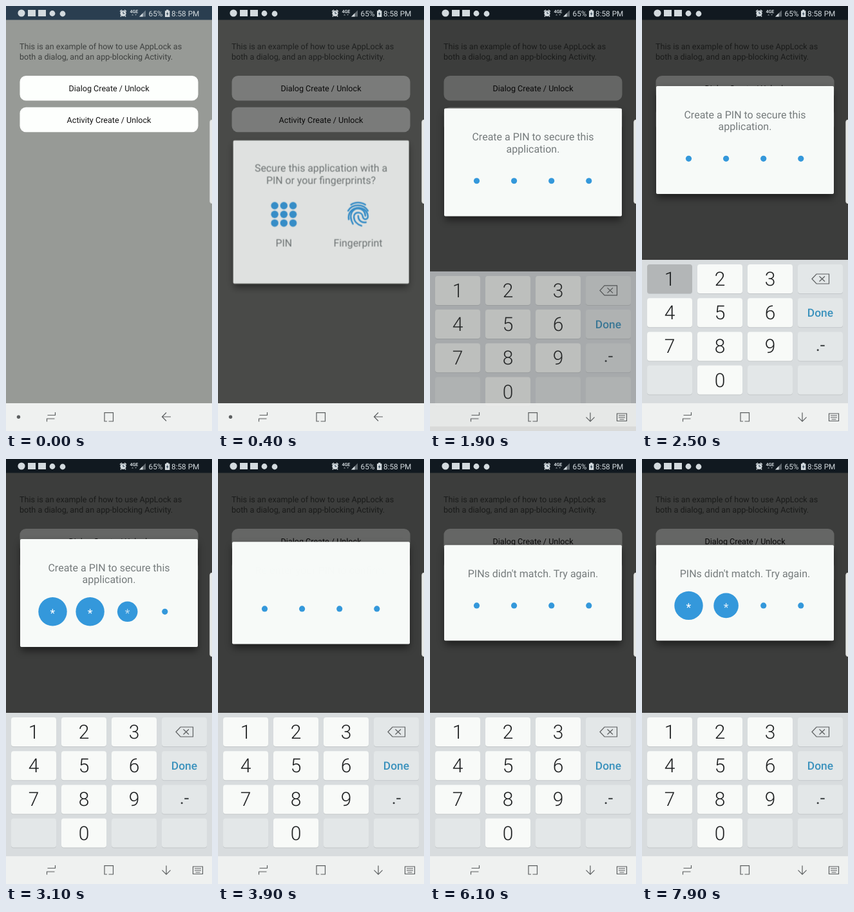
Recreate the animation shown at these times as an HTML page. Size 320 by 658 pixels, loop 8 s.

```html
<!DOCTYPE html>
<html lang="en">
<head>
<meta charset="utf-8">
<title>App lock demo</title>
<style>
html, body { margin: 0; width: 100%; height: 100%; overflow: hidden; background: #979a96; }
svg { display: block; width: 100vw; height: 100vh; }
text { font-family: Roboto, sans-serif; text-rendering: geometricPrecision; }
.mid { text-anchor: middle; }
.body { font-size: 12.6px; }
.msg { font-size: 16px; fill: #757b7c; text-anchor: middle; }
.digit { font-size: 30px; font-weight: 300; fill: #1d1f20; text-anchor: middle; }
.line { fill: none; stroke: #5c5f60; stroke-width: 1.2; }
.finger { fill: none; stroke: #3498db; stroke-width: 2.5; stroke-linecap: round; }
.blue { fill: #3498db; }
</style>
</head>
<body>
<svg viewBox="0 0 320 658" xmlns="http://www.w3.org/2000/svg">
  <defs>
    <filter id="blur" x="-20%" y="-20%" width="140%" height="150%"><feGaussianBlur stdDeviation="6"/></filter>
    <clipPath id="cut"><rect id="cutRect" width="320" height="658"/></clipPath>
  </defs>

  <rect width="320" height="658" fill="#979a96"/>
  <rect width="320" height="21.5" fill="#2a3e50"/>
  <g class="body" fill="#3e403f">
    <text x="21" y="66.5">This is an example of how to use AppLock as</text>
    <text x="21" y="83">both a dialog, and an app-blocking Activity.</text>
  </g>
  <rect x="21.5" y="108" width="277" height="38.5" rx="9.5" fill="#fdfffd"/>
  <rect x="21.5" y="156.7" width="277" height="38.5" rx="9.5" fill="#fdfffd"/>
  <g class="body mid" fill="#141414">
    <text x="160" y="132">Dialog Create / Unlock</text>
    <text x="160" y="180.8">Activity Create / Unlock</text>
  </g>
  <rect id="dim" width="320" height="658"/>

  <g fill="#d3dade">
    <circle cx="24" cy="11" r="5.6"/>
    <rect x="34" y="6" width="12" height="10"/>
    <rect x="50" y="6" width="12" height="10"/>
    <circle cx="72" cy="11.5" r="4.4"/>
    <circle cx="88" cy="12" r="4.4"/>
    <circle cx="182" cy="11.5" r="4.6"/>
    <path d="M177 8.5L180 6M187 8.5L184 6M179 15L178 16.5M185 15L186 16.5" stroke="#d3dade" stroke-width="1.5"/>
    <path d="M182 8.7V11.7H184.3" fill="none" stroke="#2a3e50"/>
    <text x="192.5" y="11" font-size="7" font-weight="700">4GE</text>
    <path d="M195 14.5l1.6-2 1.6 2zM200 12.8h3.2l-1.6 2z" opacity=".6"/>
    <path d="M207 16.5L217 6.5V16.5Z" opacity=".4"/>
    <path d="M207 16.5L212.5 11V16.5Z"/>
    <path d="M247 7.2h2v-1.4h3.4v1.4h2V17h-7.4z"/>
    <path d="M251.4 8.7l-2.6 3.7h1.7l-.5 3 2.6-3.8h-1.7z" fill="#2a3e50"/>
    <text x="221.5" y="15.6" font-size="11.8">65%</text>
    <text x="257" y="15.6" font-size="11.8">8:58 PM</text>
  </g>

  <g id="dialog" clip-path="url(#cut)">
    <rect id="shade" x="23" width="274" rx="3" opacity=".5" filter="url(#blur)"/>
    <rect id="card" x="22" width="276" rx="2" fill="#f7faf8"/>
    <g id="choose">
      <rect id="press" x="43.5" y="279" width="116.5" height="119" fill="#e2e6e6"/>
      <text class="msg" x="160" y="256">Secure this application with a</text>
      <text class="msg" x="160" y="274.5">PIN or your fingerprints?</text>
      <g id="grid" class="blue"></g>
      <g class="finger" transform="translate(218 322.5)">
        <path d="M-11-15C-5-19.5 5-19.5 11.5-15"/>
        <path d="M-15.5-5.5C-9-17 9-17 15.5-5.5"/>
        <path d="M-14.5 8C-18-13 13-17 15.5 2.5C16.5 9 8 9.5 7.5 3.5C6.500-5-7-5-6.5 4.500C-6 11-1 16 5.500 18"/>
        <path d="M-8 15C-16 0-8-9 0-9C7-9 11.500-4 11.500 2.500"/>
        <path d="M.3 2.500C.5 10 6 13.500 12.500 12.500"/>
      </g>
      <text class="msg" x="101.5" y="372.5">PIN</text>
      <text class="msg" x="218" y="372.5">Fingerprint</text>
    </g>
    <g id="entry">
      <g id="create">
        <text class="msg" x="160" y="49.5">Create a PIN to secure this</text>
        <text class="msg" x="160" y="68.300">application.</text>
      </g>
      <text id="again" class="msg" x="160" y="49.5">Re-enter your PIN to confirm.</text>
      <text id="wrong" class="msg" x="160" y="49.5">PINs didn't match. Try again.</text>
      <g id="dots"></g>
    </g>
  </g>

  <g id="keyboard">
    <rect y="393" width="320" height="240" fill="#d8dcde"/>
    <g id="keys"></g>
    <path class="line" d="M264 422.500L271 415H290.500V430H271ZM275.500 418.500L284 426.500M284 418.500L275.500 426.500"/>
    <text class="mid" x="277" y="481" font-size="17.400" font-weight="500" fill="#3b92bd">Done</text>
    <text class="mid" x="277" y="533.500" font-size="27" fill="#3c4042">.-</text>
  </g>

  <rect id="nav" y="615" width="320" height="43" fill="#eff1f0"/>
  <path class="line" d="M64.500 633.500H76.500V629M75.500 639H63.500V643.500M157 643H153V629.700H166.500V643H159.500"/>
  <path id="back" class="line" d="M256 636H242.500M249 629.500L242.500 636L249 642.500"/>
  <circle id="pin" cx="19.500" cy="636.300" r="2.700" fill="#5c5f60"/>
  <path id="toggle" class="line" d="M290.500 631H305.500V642.500H290.500ZM293 634H303M293 637H303M294.500 640H301.500"/>
  <rect x="316.500" y="176" width="8" height="130" rx="4" fill="#e6e8e7" stroke="#c4c7c5" stroke-width=".6"/>
</svg>
<script>
const NS = 'http://www.w3.org/2000/svg';
const LOOP = 8000, SMALL = 4.6, BIG = 22.2, GROW = 140, HOLD = 105;
const $ = id => document.getElementById(id);
const set = (el, attrs) => { for (const k in attrs) el.setAttribute(k, attrs[k]); return el; };
const add = (parent, tag, attrs, text) => {
  const el = set(document.createElementNS(NS, tag), attrs);
  if (text) el.textContent = text;
  return parent.appendChild(el);
};
const ramp = (t, a, b) => Math.min(1, Math.max(0, (t - a) / (b - a)));
const easeOut = u => 1 - (1 - u) * (1 - u);
const smooth = u => u * u * (3 - 2 * u);
const mix = (a, b, u) => a + (b - a) * u;
const fade = (id, v) => set($(id), { opacity: v });

// Digit times of each PIN entry, then when its circles shrink again
const entries = [
  { taps: [2590, 2795, 3012, 3232], clear: [3620, 3880] },
  { taps: [4595, 4836, 5050, 5260], clear: [5850, 6080] },
  { taps: [7490, 7784, 8010], clear: [9000, 9001] }
];
const taps = entries.flatMap(e => e.taps);
const doneTaps = [[3480, 3600], [5760, 5870]];

for (let i = 0; i < 9; i++)
  add($('grid'), 'circle', { cx: 87.2 + i % 3 * 14.4, cy: 309 + (i / 3 | 0) * 13.6, r: 5.8 });

const dots = [0, 1, 2, 3].map(i => {
  const x = 72.5 + i * 58.1;
  return {
    disc: add($('dots'), 'circle', { cx: x, cy: 0, class: 'blue' }),
    star: add($('dots'), 'text', { x, y: 8.8, 'font-size': 18, fill: '#fff', class: 'mid' }, '*')
  };
});

const labels = ['1', '2', '3', '', '4', '5', '6', '', '7', '8', '9', '', '', '0'];
const keys = [];
for (let i = 0; i < 16; i++) {
  const x = 8 + i % 4 * 78, y = 400 + (i >> 2) * 52.2, label = labels[i];
  add($('keys'), 'rect', { x, y: y + 1, width: 70, height: 45, rx: 4, fill: '#c3c7c9' });
  keys.push(add($('keys'), 'rect', { x, y, width: 70, height: 45, rx: 4, fill: label ? '#f8faf8' : '#e3e7e8' }));
  if (label) add($('keys'), 'text', { x: x + 35, y: y + 33, class: 'digit' }, label);
}

function growth(i, t) {
  return Math.max(...entries.map(({ taps, clear }) =>
    i < taps.length ? ramp(t, taps[i], taps[i] + GROW) * (1 - smooth(ramp(t, ...clear))) : 0));
}

function draw(t) {
  const open = easeOut(ramp(t, 230, 500));
  const shrink = smooth(ramp(t, 1450, 1700));
  const rise = easeOut(ramp(t, 1750, 2090));
  const compact = smooth(ramp(t, 3700, 4120));

  // Dialog
  fade('dim', 0.6 * open);
  const zoom = mix(0.92, 1, open);
  set($('dialog'), {
    opacity: open,
    transform: `translate(160 319) scale(${zoom}) translate(-160 -319)`
  });
  set($('cutRect'), { height: t >= 1350 && t < 1450 ? 415.5 : 658 });
  const top = mix(207, 235.5, shrink) - 111.5 * rise + 9.3 * compact;
  const height = mix(224, 167, shrink) - 19 * compact;
  set($('card'), { y: top, height });
  set($('shade'), { y: top + 6, height });

  fade('choose', 1 - ramp(t, 1420, 1580));
  fade('press', ramp(t, 1330, 1390));
  set($('entry'), { transform: `translate(0 ${top})`, opacity: ramp(t, 1580, 1800) });
  fade('create', 1 - ramp(t, 3650, 3880));
  fade('again', ramp(t, 3900, 4190) * (1 - ramp(t, 5850, 5960)));
  fade('wrong', ramp(t, 5950, 6080));
  set($('dots'), { transform: `translate(0 ${mix(112.3, 93.6, compact)})` });
  dots.forEach(({ disc, star }, i) => {
    const g = growth(i, t);
    set(disc, { r: mix(SMALL, BIG, g) });
    set(star, { opacity: g });
  });

  // Keyboard
  set($('keyboard'), { opacity: rise, transform: `translate(0 ${58 * (1 - rise)})` });
  const held = taps.some(s => t >= s - HOLD && t < s);
  const done = doneTaps.some(([a, b]) => t >= a && t < b);
  set(keys[0], { fill: held ? '#b3b6b7' : '#f8faf8' });
  set(keys[7], { fill: done ? '#b3b6b7' : '#e3e7e8' });

  // Navigation bar
  const typing = t >= 1750;
  fade('nav', rise > 0 && rise < 1 ? 0.88 : 1);
  fade('pin', typing ? 0 : 1);
  fade('toggle', typing ? 1 : 0);
  set($('back'), { transform: `rotate(${typing ? -90 : 0} 249.3 636.3)` });
}

const start = performance.now();
function tick() {
  draw((performance.now() - start) % LOOP);
  requestAnimationFrame(tick);
}
tick();
</script>
</body>
</html>
```
